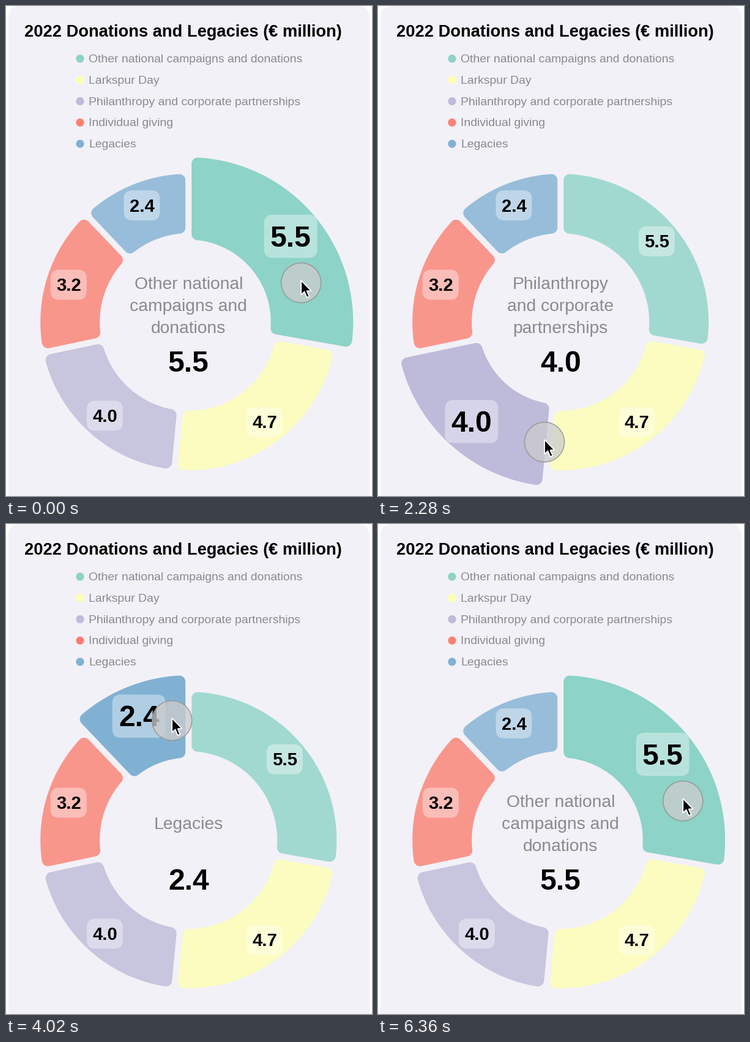
These frames come from a looping animation (598x800 px, 6420 ms). A matplotlib script:

```python
import numpy as np
import matplotlib.pyplot as plt
from matplotlib.animation import FuncAnimation
from matplotlib.patches import Circle, FancyBboxPatch, Polygon

W, H, DPI = 598, 800, 100
STEP, LOOP = 60, 6420
CX, CY = 298.2, 516
HALF_GAP, CORNER = 5, 10
GREY = "#8a8a8f"
EASE_MS = 220

# name, centre text, value, colour
SECTORS = [
    ("Other national campaigns and donations",
     "Other national\ncampaigns and\ndonations", 5.5, "#8dd3c7"),
    ("Larkspur Day", "Larkspur Day", 4.7, "#ffffb3"),
    ("Philanthropy and corporate partnerships",
     "Philanthropy\nand corporate\npartnerships", 4.0, "#bebada"),
    ("Individual giving", "Individual giving", 3.2, "#fb8072"),
    ("Legacies", "Legacies", 2.4, "#80b1d3"),
]
values = np.array([s[2] for s in SECTORS])
edges = np.r_[0, np.cumsum(values)] / values.sum() * 360

# Pointer path around the ring: ms, bearing in degrees, radius
KEYS = np.array([
    (0, 70.8, 194.8), (540, 100, 195), (1140, 126.2, 193.2),
    (1950, 186.2, 195), (2280, 187.6, 197.7), (3000, 249.2, 227.9),
    (4020, 352.1, 196.9), (5220, 415.2, 222.6), (6360, 432.3, 210),
])


def mix(a, b, k):
    return a + (b - a) * k


def smooth(x):
    x = np.clip(x, 0, 1)
    return 1 - (1 - x) ** 2


def glide(t, times, vals):
    """Monotone cubic interpolation."""
    slope = np.diff(vals) / np.diff(times)
    a, b = slope[:-1], slope[1:]
    inner = np.where(a * b > 0, 2 * a * b / np.where(a + b == 0, 1, a + b), 0)
    m = np.r_[slope[0], inner, slope[-1]]
    i = np.clip(np.searchsorted(times, t, side="right") - 1, 0, len(times) - 2)
    h = times[i + 1] - times[i]
    u = np.clip((t - times[i]) / h, 0, 1)
    return ((2 * u**3 - 3 * u**2 + 1) * vals[i] + (u**3 - 2 * u**2 + u) * h * m[i]
            + (3 * u**2 - 2 * u**3) * vals[i + 1] + (u**3 - u**2) * h * m[i + 1])


def polar(bearing, radius, origin=(CX, CY)):
    a = np.radians(bearing)
    return np.column_stack([origin[0] + radius * np.sin(a),
                            origin[1] - radius * np.cos(a)])


def sector(a0, a1, r, R):
    """Ring segment with parallel gaps and rounded corners."""
    c, off = CORNER, HALF_GAP + CORNER
    do = np.degrees(np.arcsin(off / (R - c)))
    di = np.degrees(np.arcsin(off / (r + c)))

    def fillet(bearing, radius, start, stop):
        origin = polar([bearing], radius)[0]
        return polar(np.linspace(start, stop, 10), c, origin)

    o0, o1, i0, i1 = a0 + do, a1 - do, a0 + di, a1 - di
    return np.vstack([
        fillet(o0, R - c, a0 - 90, o0),
        polar(np.linspace(o0, o1, 60), R),
        fillet(o1, R - c, o1, a1 + 90),
        fillet(i1, r + c, a1 + 90, i1 + 180),
        polar(np.linspace(i1, i0, 60), r),
        fillet(i0, r + c, i0 + 180, a0 + 270),
    ])


# Moments at which the pointer enters each sector
fine = np.arange(0, 6361, 5)
bearings = glide(fine, KEYS[:, 0], KEYS[:, 1])
enter = fine[np.searchsorted(bearings, edges[1:])]


def hover(t):
    """How far each sector is raised, 0 to 1."""
    k = smooth((t - enter) / EASE_MS)
    return np.r_[1 - k[0] + k[4], k[:-1] - k[1:]]


fig = plt.figure(figsize=(W / DPI, H / DPI), dpi=DPI, facecolor="#fdfdfe")
ax = fig.add_axes([0, 0, 1, 1])
ax.set(xlim=(0, W), ylim=(H, 0))
ax.axis("off")


def text(x, y, s, px, color="black", weight="normal", ha="center", z=4):
    return ax.text(x, y, s, fontsize=px * 72 / DPI, color=color, weight=weight,
                   ha=ha, va="baseline", family="Liberation Sans", zorder=z)


def rounded(x, y, w, h, radius, **kw):
    style = f"round,pad=0,rounding_size={radius}"
    return ax.add_patch(FancyBboxPatch((x, y), w, h, boxstyle=style, lw=0, **kw))


rounded(4, 0, 590, 850, 20, fc="#f2f1f7", zorder=0)
text(30, 50, "2022 Donations and Legacies (€ million)", 27.3,
     weight="bold", ha="left")

slices, boxes, labels, centres = [], [], [], []
for i, (name, caption, value, color) in enumerate(SECTORS):
    y = 86 + 34.75 * i
    ax.add_patch(Circle((121, y), 6.6, fc=color, lw=0))
    text(135, y + 6, name, 19.35, GREY, ha="left")

    slices.append(ax.add_patch(Polygon([(0, 0)], fc=color, lw=0, zorder=2)))
    boxes.append(rounded(0, 0, 59, 49, 14, fc="white", alpha=0.38, zorder=3))
    labels.append(text(0, 0, f"{value:.1f}", 29.3, weight="bold"))

    lines = caption.split("\n")
    group = [text(CX, 498 + 36 * (n - (len(lines) - 1) / 2), line, 28.2, GREY)
             for n, line in enumerate(lines)]
    group.append(text(CX, 597, f"{value:.1f}", 48, weight="bold"))
    centres.append(group)

halo = ax.add_patch(Circle((0, 0), 32.5, fc=(0.8, 0.8, 0.8, 0.77),
                           ec=(0.58, 0.58, 0.58, 0.9), lw=1.1, zorder=6))
ARROW = np.array([(0, 0), (0, 23.5), (5.4, 18.6), (9.4, 28),
                  (13.4, 26.3), (9.4, 17.2), (16.6, 17.2)])
arrow = ax.add_patch(Polygon(ARROW, fc="black", ec="white", lw=1.3,
                             joinstyle="miter", zorder=7))


def draw(frame):
    t = frame * STEP
    for i, k in enumerate(hover(t)):
        a0, a1 = edges[i], edges[i + 1]
        r, R = mix(145, 134.5, k), mix(242, 269, k)
        slices[i].set_xy(sector(a0, a1, r, R))
        slices[i].set_alpha(mix(0.8, 1, k))

        x, y = polar([(a0 + a1) / 2], mix(r, R, 0.62))[0]
        w, h, px = mix(59, 87, k), mix(49, 70.5, k), mix(29.3, 48, k)
        boxes[i].set_bounds(x - w / 2, y - h / 2, w, h)
        labels[i].set_position((x, y + 0.345 * px))
        labels[i].set_fontsize(px * 72 / DPI)

        for item in centres[i]:
            item.set_alpha(float(np.clip(k, 0, 1)))
            item.set_visible(k > 0.001)

    bearing, radius = (glide(t, KEYS[:, 0], KEYS[:, n]) for n in (1, 2))
    spot = polar([bearing], radius)[0]
    halo.set_center(spot)
    arrow.set_xy(ARROW + spot + (0, -4))
    return []


anim = FuncAnimation(fig, draw, frames=LOOP // STEP, interval=STEP,
                     repeat=True, repeat_delay=0, blit=False)
plt.show()
```
